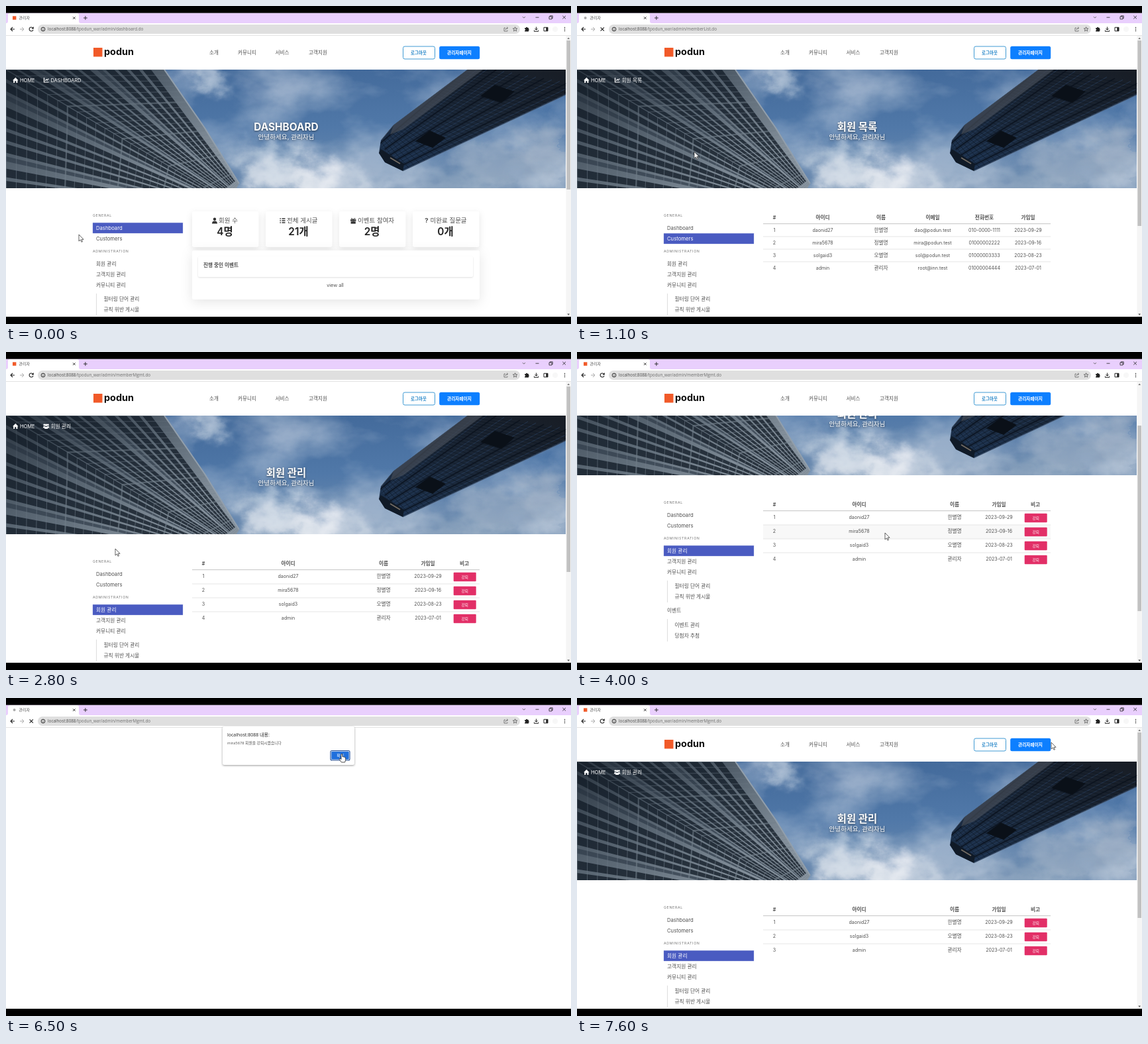
An HTML page for the animation above (7700 ms loop, 853 by 480 pixels).

```html
<!DOCTYPE html>
<html lang="ko">
<head>
<meta charset="utf-8">
<title>관리자</title>
<style>
html,body{margin:0;width:100%;height:100%;overflow:hidden;background:#000}
svg{display:block;width:853px;height:480px;font-family:Inter,"Noto Sans CJK KR","Noto Sans KR","Noto Sans CJK",sans-serif;fill:#505050}
.m{text-anchor:middle}
.b{font-weight:700}
.w{fill:#fff}
.s{fill:none;stroke:#333;stroke-width:1}
.ui{font-family:"Open Sans","Noto Sans CJK KR",sans-serif}
.glow{filter:drop-shadow(0 1px 1.5px rgba(0,0,0,.55))}
.card{fill:#fff;filter:drop-shadow(0 3px 5px rgba(0,0,0,.1))}
</style>
</head>
<body>
<svg id="stage" viewBox="0 0 853 480" xmlns="http://www.w3.org/2000/svg"></svg>
<script>
const LOOP = 7700;
const BRAND = 'podun', BASE = 'localhost:8088';
const stage = document.getElementById('stage');

const text = (x, y, s, size = 7.7, cls = '', extra = '') =>
  `<text x="${x}" y="${(y + size * .36).toFixed(2)}" font-size="${size}" class="${cls}" ${extra}>${s}</text>`;
const rect = (x, y, w, h, fill, extra = '') =>
  `<rect x="${x}" y="${y}" width="${w}" height="${h}" fill="${fill}" ${extra}/>`;
const line = (d, stroke, w = 1, extra = '') =>
  `<path d="${d}" fill="none" stroke="${stroke}" stroke-width="${w}" ${extra}/>`;
const poly = (pts, fill, extra = '') => `<polygon points="${pts}" fill="${fill}" ${extra}/>`;
const group = (id, body, extra = '') => `<g id="${id}" ${extra}>${body}</g>`;
const list = (n, f) => Array.from({length: n}, (_, i) => f(i));
const range = (n, f) => list(n, f).join('');
const mix = (a, b, k) => a + (b - a) * k;

/* ---------- banner ---------- */
function cloud(x, y, rx, ry, o, fill = '#eef1f5') {
  return `<ellipse cx="${x}" cy="${y}" rx="${rx}" ry="${ry}" fill="${fill}" opacity="${o}"/>`;
}

function sky() {
  const clouds =
    cloud(316, 114, 28, 20, .5) + cloud(290, 100, 34, 12, .4) + cloud(400, 130, 40, 10, .2) +
    cloud(425, 262, 74, 24, .75) + cloud(400, 232, 36, 22, .5) + cloud(485, 248, 36, 24, .6) +
    cloud(505, 272, 60, 12, .55) + cloud(362, 222, 20, 18, .3) + cloud(450, 212, 26, 12, .28) +
    cloud(590, 268, 60, 9, .25) + cloud(735, 236, 62, 24, .38, '#c3cad5') +
    cloud(810, 212, 46, 32, .42, '#b9c2ce') + cloud(700, 265, 70, 14, .28, '#ccd3dc') + cloud(810, 262, 50, 14, .3);
  return rect(0, 96, 845, 179, 'url(#sky)') + rect(230, 96, 615, 179, '#fff', 'filter="url(#haze)" opacity=".4"') +
    `<g filter="url(#wisp)">${clouds}</g>`;
}

// Ribs fan out from the stage edge to the roof tip; floors cross them.
function leftTower() {
  const foot = k => { const d = k * 422; return d < 243 ? [240 - d, 96] : [0, d - 147]; };
  const at = (k, m) => {
    const [x, y] = foot(k);
    return `${mix(x, 352 - 40 * k, m).toFixed(1)},${mix(y, 268 + 40 * k, m).toFixed(1)}`;
  };
  const bays = range(22, i => {
    const a = .05 + i * .044, b = a + (i % 5 === 4 ? .018 : .031);
    return poly([at(a, 0), at(b, 0), at(b, .97), at(a, .97)].join(' '), i % 5 === 4 ? '#3a4653' : '#17202b', 'opacity=".82"');
  });
  const floors = range(30, i => {
    const m = 1 - (1 - i / 30) ** 1.5;
    return line('M' + list(15, j => at(j / 14, m)).join('L'), '#76838f', i % 6 ? .9 : 2.2, 'opacity=".62"');
  });
  return `<g clip-path="url(#tower)">${rect(0, 96, 354, 179, 'url(#wall)')}${bays}${floors}` +
    rect(0, 96, 354, 179, 'url(#shade)') + '</g>' + line('M239 96L300 184L352 268', '#929fac', 2);
}

function rightTower() {
  const beams = range(15, i => {
    const k = i / 14;
    return line(`M${mix(564, 600, k)} ${mix(208, 248, k)}L${mix(704, 872, k)} ${mix(90, 120, k)}`,
      i % 3 ? '#2f4c74' : '#0a111b', i % 3 ? .7 : 1.8, 'opacity=".75"');
  });
  const floors = range(34, i => {
    const k = i / 34;
    return line(`M${mix(566, 704, k)} ${mix(205, 90, k)}L${mix(600, 872, k)} ${mix(248, 120, k)}`, '#0b1420', .9, 'opacity=".6"');
  });
  return poly('697,96 845,96 845,134 599,249 572,236 563,222 566,203 585,180', 'url(#glass)') +
    `<g clip-path="url(#mast)">${beams}${floors}` +
    poly('697,96 720,96 600,186 580,194 585,180', '#454c58', 'opacity=".7"') +
    poly('618,204 640,188 664,199 644,214', '#0a1018') + poly('716,136 738,119 768,129 748,146', '#0a1018') +
    poly('563,222 566,216 601,238 599,249 572,236', '#101a27') +
    line('M580 229L595 238', '#b9a58c', 1.6, 'opacity=".6"') + '</g>' +
    line('M566 203L585 180L697 96', '#3e4a5b', 1) + line('M599 249L845 134', '#46566c', .9);
}

/* ---------- page parts ---------- */
const homeIcon = '<path class="w" d="M10 112.2L14.3 108L18.6 112.2H17.4V116H15.4V113.3H13.2V116H11.2V112.2Z"/>';
const chartIcon = line('M57.5 108.3V115H64.5', '#fff', 1.2) + line('M59 113L61 110.8L62.3 112L64.3 109.6', '#fff', 1.1);
const usersIcon = [[57.8, 110, 1.4], [63.4, 110, 1.4], [60.6, 110.2, 1.8]].map(([x, y, r]) =>
  `<circle class="w" cx="${x}" cy="${y}" r="${r}"/><path class="w" d="M${x - r * 1.4} ${y + r * 3.2}q0 -${r * 1.7} ${r * 1.4} -${r * 1.7}t${r * 1.4} ${r * 1.7}z"/>`).join('');

const heading = (name, icon, size) =>
  homeIcon + text(21, 112, 'HOME', 7.5, 'w') + icon + text(67.5, 112, name, size, 'w') +
  `<g class="glow">${text(423, 182, name, 15.4, 'w m b')}${text(423, 197.5, '안녕하세요, 관리자님', 9.6, 'w m')}</g>`;

const MENU = [
  [136, 335, 'Dashboard'], [136, 351, 'Customers'], [136, 389, '회원 관리'], [136, 405, '고객지원 관리'],
  [136, 421, '커뮤니티 관리'], [147.5, 442, '필터링 단어 관리'], [147.5, 458, '규칙 위반 게시물'],
  [136, 479.5, '이벤트'], [147.5, 501, '이벤트 관리'], [147.5, 517, '당첨자 추첨']
];
function sidebar(active) {
  const caption = (y, s) => text(131, y, s, 5.3, '', 'letter-spacing=".65" fill="#777"');
  return caption(316, 'GENERAL') + caption(370, 'ADMINISTRATION') +
    rect(131, MENU[active][1] - 7.8, 136, 15.8, '#4a5bc1', 'stroke="#8f9adb" stroke-width=".6" stroke-dasharray="1 1"') +
    MENU.map(([x, y, s], i) => text(x, y, s, 7.7, i === active ? 'w' : '')).join('') +
    line('M136.5 434V467M136.5 492V526', '#ddd');
}

const footer = text(136, 595, '회사 소개', 7.7) + text(180, 595, '커뮤니티', 7.7) + text(223, 595, '고객지원', 7.7) +
  rect(380, 588, 16, 16, '#f15a29') + text(400, 594, BRAND, 18, 'b', 'fill="#111"') +
  rect(696, 587, 18, 18, '#0d7ff5', 'rx="2"');

function table(cols, rows, step, kick) {
  const cell = (x, y, s, cls = 'm') => text(x, y, s, /[가-힣]/.test(s) ? 7.7 : 7.1, cls);
  return rect(281, 0, 434, step, '#f8f8f8', 'class="hover" visibility="hidden"') +
    cols.map(([x, s]) => cell(x, 319, s, 'm b')).join('') + line('M281 328.7H715', '#cfcfcf', 1.2) +
    rows.map((r, i) => {
      const y = 338.3 + i * step;
      return cell(cols[0][0], y, String(i + 1)) + r.map((s, j) => cell(cols[j + 1][0], y, s)).join('') +
        (kick ? rect(675.7, y - 5.5, 34, 13.5, '#e22f67', 'rx="1"') + text(692.7, y + 1.3, '강퇴', 5.6, 'w m') : '') +
        (i < rows.length - 1 ? line(`M281 ${329 + (i + 1) * step}H715`, '#e3e3e3', .9) : '');
    }).join('');
}

const MEMBERS = [
  ['daonid27', '한별명', 'dao@podun.test', '010-0000-1111', '2023-09-29'],
  ['mira5678', '정별명', 'mira@podun.test', '01000002222', '2023-09-16'],
  ['solgaid3', '오별명', 'sol@podun.test', '01000003333', '2023-08-23'],
  ['admin', '관리자', 'root@inn.test', '01000004444', '2023-07-01']
];
const listTable = table([[298, '#'], [371, '아이디'], [459, '이름'], [537, '이메일'], [615, '전화번호'], [681, '가입일']], MEMBERS, 19);
const mgmtTable = rows => table([[298, '#'], [426, '아이디'], [570, '이름'], [637, '가입일'], [692, '비고']],
  rows.map(r => [r[0], r[1], r[4]]), 21, true);

function dashboard() {
  const icons = [
    '<circle cx="315" cy="321.8" r="2.2" fill="#333"/><path d="M311 328.5q0 -4 4 -4t4 4z" fill="#333"/>',
    line('M413.5 321H415M416.5 321H421.5M413.5 324H415M416.5 324H421.5M413.5 327H415M416.5 327H421.5', '#333', 1.3),
    rect(520, 322.2, 8.4, 2.4, '#333') + rect(520.6, 325.2, 7.2, 3.4, '#333') + line('M524.2 322q-4 -3 -2.6 -.2M524.2 322q4 -3 2.6 -.2M524.2 322V328', '#333', .9),
    text(635, 324, '?', 9.6, 'm b')
  ];
  const cards = [[281, 321, '회원 수', '4명'], [392, 424, '전체 게시글', '21개'], [503, 531, '이벤트 참여자', '2명'], [614, 640.5, '미완료 질문글', '0개']];
  return cards.map(([x, tx, label, n], i) =>
    `<rect class="card" x="${x}" y="310" width="100.5" height="54" rx="3"/>` + icons[i] +
    text(tx, 324, label, 9.5) + text(x + 49.5, 340, n, 15.4, 'm', 'font-weight="600" fill="#222"')).join('') +
    '<rect class="card" x="281" y="369" width="434" height="74" rx="3" style="filter:drop-shadow(0 4px 9px rgba(0,0,0,.1))"/>' +
    '<rect class="card" x="290" y="378" width="415" height="31" rx="2" style="filter:drop-shadow(0 1px 1.2px rgba(0,0,0,.13))"/>' +
    text(298, 391, '진행 중인 이벤트', 7.7, 'b') + text(497, 421, 'view all', 7.3, 'm');
}

const header = rect(0, 45, 845, 51, '#fff') + rect(132, 63, 13.5, 13.5, '#f15a29') +
  text(148, 69, BRAND, 14.4, 'b', 'fill="#111"') +
  [[314, '소개'], [364, '커뮤니티'], [417, '서비스'], [471, '고객지원']].map(([x, s]) => text(x, 70, s, 7.6, 'm')).join('') +
  rect(599.5, 61, 48, 19, '#fff', 'rx="2.5" stroke="#2b8fd0" stroke-width=".9"') + text(623, 70.3, '로그아웃', 6.5, 'm b', 'style="fill:#2586c8"') +
  rect(654.2, 60.7, 61, 19.5, '#0d7fff', 'rx="2.5"') + text(684.5, 70.3, '관리자페이지', 6.7, 'm b w');

const scrollbar = rect(845.4, 45, 7.6, 424, '#f5f5f5') + poly('847.4,50 849.2,47.6 851,50', '#777') +
  poly('847.4,464.5 849.2,467 851,464.5', '#555') + rect(846.4, 52, 5.6, 280, '#c1c1c1', 'id="thumb"');

/* ---------- browser frame ---------- */
const frame = rect(0, 10.75, 853, 15.25, '#e9cffd') + '<path d="M0 26q3 0 3 -3V14q0 -3 3 -3H107q3 0 3 3V23q0 3 3 3z" fill="#fff"/>' +
  rect(0, 26, 853, 18.5, '#fff') + rect(0, 44, 853, .8, '#dcdcdc') + rect(48, 28, 728, 14, '#dfdfdf', 'rx="7"') +
  rect(10, 15.3, 5.4, 5.4, '#f15a29', 'id="favicon"') + '<circle id="spin" cx="12.6" cy="18" r="2" fill="#aaa"/>' +
  text(19.5, 17.8, '관리자', 6, 'ui') +
  line('M101 16.3L104.6 19.9M104.6 16.3L101 19.9M117 18H122.8M119.9 15.1V20.9', '#222', .9) +
  line('M779.8 16L781.9 18.1L784 16', '#555', .8) +
  line('M799.5 17.2H804.5M840.3 14.8L845 19.4M845 14.8L840.3 19.4M820 16H824V19.8H820ZM821.3 16V14.8H825.2V18.6H824', '#222', .8) +
  line('M13 35H7M10 32L7 35L10 38', '#222', 1.1) + line('M21 35H27M24 32L27 35L24 38', '#aaa', 1) +
  line('M40.6 33.3A3 3 0 1 0 41 35.8M41.3 31.6V33.9H38.9', '#222', 1.1, 'id="reload"') +
  line('M35.6 32.4L40.9 37.7M40.9 32.4L35.6 37.7', '#222', 1.1, 'id="stop"') +
  '<circle cx="56" cy="35" r="2.9" class="s" stroke-width=".8"/>' + line('M56 34.6V36.8M56 33.1V33.8', '#333', .8) +
  `<text x="63" y="37.3" font-size="6.3" class="ui" fill="#4a4a4a">${BASE}<tspan id="path" fill="#6c6c6c"></tspan></text>` +
  line('M754 33H752V38H757V36.5M754 36.2Q754.2 33.2 757.5 33.2M756 31.6L757.7 33.2L756 34.8', '#666', .8) +
  line('M768.6 31.7L769.5 34H771.9L770 35.5L770.7 38L768.6 36.6L766.5 38L767.2 35.5L765.3 34H767.7Z', '#555', .8) +
  '<path d="M783.2 33H785A1.2 1.2 0 0 1 787.4 33H789V34.8A1.2 1.2 0 0 1 789 37V38.4H783.2V36.8A1 1 0 0 0 783.2 34.8Z" fill="#222"/>' +
  line('M800.5 31.5V36M798.3 34L800.5 36.2L802.7 34M797.4 36.5V38.3H803.6V36.5', '#222', 1) +
  line('M812 32.3H818V37.8H812Z', '#222', 1) + rect(815.3, 32.3, 2.7, 5.5, '#222') +
  '<circle cx="829" cy="35" r="4" fill="#f7f7f7"/>' + [32.5, 35, 37.5].map(y => `<circle cx="843.5" cy="${y}" r=".75" fill="#222"/>`).join('');

const dialog = '<rect x="327" y="43" width="199" height="58" rx="2.5" fill="#fff" style="filter:drop-shadow(0 1px 1.6px rgba(0,0,0,.4))"/>' +
  text(334, 55, BASE + ' 내용:', 7, 'ui', 'fill="#222"') + text(334, 68, 'mira5678 회원을 강퇴시켰습니다', 5.8, 'ui') +
  rect(490, 79.5, 29, 14.5, '#fff', 'rx="2" stroke="#1c4a94" stroke-width="1.1"') + rect(491.3, 80.8, 26.4, 11.9, '#1f6fdc', 'rx="1"') +
  text(504.7, 86.8, '확인', 6, 'w m ui');

const arrow = '<path id="arrow" d="M0 0V10L2.4 7.9L4 11.3L5.5 10.6L4 7.3H7.1Z" fill="#fff" stroke="#222" stroke-width=".7"/>';
const hand = '<path id="hand" d="M-1 1Q0 -.6 1 1V4.6Q2 4 2.6 5Q3.7 4.5 4.2 5.6Q5.6 5.3 5.7 6.8V9.5L4.6 13H-.6L-3.7 8.8Q-4.2 7.3 -2.6 7.4L-1 8.6Z" fill="#fff" stroke="#222" stroke-width=".8"/>';

const stops = pairs => pairs.map(([o, c]) => `<stop offset="${o}" stop-color="${c}"/>`).join('');
const defs = `<defs>
<linearGradient id="sky" x1=".4" y1="0" x2=".6" y2="1">${stops([[0, '#42699a'], [.5, '#5078a8'], [1, '#6f8db0']])}</linearGradient>
<linearGradient id="wall" x1="0" y1="0" x2="1" y2=".6">${stops([[0, '#4a5662'], [.55, '#66737f'], [1, '#87939e']])}</linearGradient>
<linearGradient id="shade" x1="0" y1="0" x2=".7" y2=".8">${stops([[0, 'rgba(14,22,32,.5)'], [.6, 'rgba(20,32,46,.12)'], [1, 'rgba(20,32,46,0)']])}</linearGradient>
<linearGradient id="glass" x1="0" y1="1" x2="1" y2="0">${stops([[0, '#1a2f4b'], [.5, '#1a2636'], [1, '#181d25']])}</linearGradient>
<filter id="haze" filterUnits="userSpaceOnUse" x="230" y="96" width="615" height="179">
<feTurbulence type="fractalNoise" baseFrequency=".008 .014" numOctaves="5" seed="4"/>
<feColorMatrix values="0 0 0 0 .85 0 0 0 0 .88 0 0 0 0 .92 2.2 0 0 0 -.75"/></filter>
<filter id="wisp" filterUnits="userSpaceOnUse" x="0" y="60" width="846" height="250">
<feGaussianBlur stdDeviation="10" result="soft"/><feTurbulence type="fractalNoise" baseFrequency=".022 .03" numOctaves="5" seed="7" result="n"/>
<feDisplacementMap in="soft" in2="n" scale="64" xChannelSelector="R" yChannelSelector="G"/></filter>
<clipPath id="view"><rect x="0" y="45" width="853" height="424"/></clipPath>
<clipPath id="banner"><rect x="0" y="96" width="845.4" height="179"/></clipPath>
<clipPath id="tower"><path d="M0 96H239L300 184L352 268L348 275H0Z"/></clipPath>
<clipPath id="mast"><path d="M697 96H846V134L599 249L572 236L563 222L566 203L585 180Z"/></clipPath>
</defs>`;

const mgmtPage = rows => heading('회원 관리', usersIcon, 7.7) + sidebar(2) + mgmtTable(rows);
stage.innerHTML = defs + rect(0, 0, 853, 480, '#000') + rect(0, 10.75, 853, 458.5, '#fff') +
  group('site', `<g clip-path="url(#view)"><g id="scroll">
    <g clip-path="url(#banner)">${sky()}${leftTower()}${rightTower()}</g>` +
    group('dash', heading('DASHBOARD', chartIcon, 7.4) + sidebar(0) + dashboard()) +
    group('list', heading('회원 목록', chartIcon, 7.7) + sidebar(1) + listTable) +
    group('mgmt', mgmtPage(MEMBERS)) +
    group('after', mgmtPage(MEMBERS.filter((_, i) => i !== 1))) + footer +
    `</g></g>${header}${scrollbar}`) +
  frame + group('dialog', dialog) + rect(0, 469.25, 853, 10.75, '#000') + group('cursor', arrow + hand);

/* ---------- motion ---------- */
const MOVES = [[0, 110, 345], [500, 153, 349], [800, 153, 349], [1100, 177, 220], [1500, 464, 282], [1900, 464, 282],
  [2300, 152, 260], [2500, 152, 260], [2800, 165, 297], [3400, 465, 273], [4000, 465, 273], [4300, 560, 272],
  [4400, 560, 272], [4900, 690, 270], [5300, 690, 270], [5900, 507, 84], [6600, 507, 84], [7500, 716, 67], [LOOP, 716, 67]];
const SCROLL = [[0, 0], [1500, 0], [1800, 128], [2599, 128], [2600, 0], [3600, 0], [4000, 89], [5199, 89], [5200, 0], [LOOP, 0]];
const PAGES = [[800, 'dash'], [2600, 'list'], [5200, 'mgmt'], [6700, 'blank'], [LOOP, 'after']];
const LOADING = [[700, 1300], [2500, 2800], [5100, 6900]];
const POINTING = [[400, 900], [2200, 2600], [4800, 5200], [5900, 6700]];

const $ = id => document.getElementById(id);
const show = (id, on) => $(id).style.display = on ? '' : 'none';
const within = (spans, t) => spans.some(([a, b]) => t >= a && t < b);
function sample(keys, t) {
  const i = keys.findIndex(k => k[0] > t), a = keys[i - 1], b = keys[i];
  const k = (t - a[0]) / (b[0] - a[0]), e = k * k * (3 - 2 * k);
  return a.slice(1).map((v, j) => mix(v, b[j + 1], e));
}

function render(ms) {
  const t = Math.floor(ms % LOOP / 100) * 100;
  const page = PAGES.find(p => t < p[0])[1];
  const [x, y] = sample(MOVES, t), [top] = sample(SCROLL, t);
  const busy = within(LOADING, t), pointing = within(POINTING, t);

  for (const id of ['dash', 'list', 'mgmt', 'after']) show(id, id === page);
  show('site', page !== 'blank');
  show('dialog', page === 'blank' && t >= 5400);
  show('reload', !busy); show('stop', busy);
  show('favicon', !busy); show('spin', busy);
  show('hand', pointing); show('arrow', !pointing);
  $('path').textContent = `/t${BRAND}_war/admin/` + ({dash: 'dashboard', list: 'memberList'}[page] || 'memberMgmt') + '.do';

  $('scroll').setAttribute('transform', `translate(0 ${-top})`);
  $('thumb').setAttribute('y', 52 + top * .664);
  $('thumb').setAttribute('height', page === 'dash' ? 225 : 280);
  $('cursor').setAttribute('transform', `translate(${x} ${y})`);

  const hover = page !== 'blank' && $(page).querySelector('.hover');
  if (hover) {
    const step = +hover.getAttribute('height'), row = Math.floor((y + top - 329) / step);
    const on = x > 281 && x < 715 && row >= 0 && row < (page === 'after' ? 3 : 4);
    hover.setAttribute('visibility', on ? 'visible' : 'hidden');
    hover.setAttribute('y', 329 + row * step);
  }
}

const start = performance.now();
function tick() {
  render(performance.now() - start);
  requestAnimationFrame(tick);
}
tick();
</script>
</body>
</html>
```
